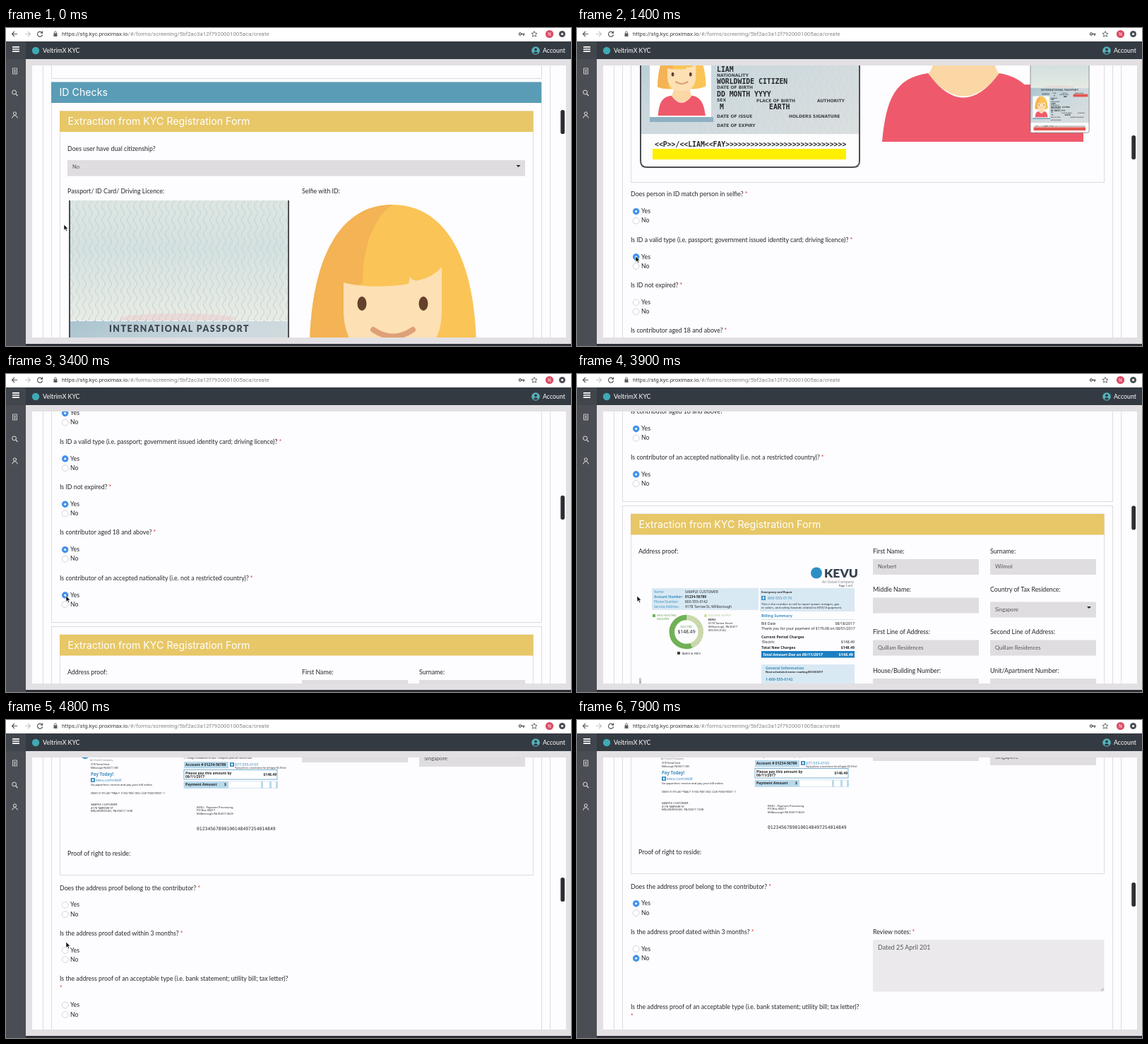
Animation, 800 px wide and 450 px high, one loop 8 s. Source, as an HTML page:

```html
<!DOCTYPE html>
<html lang="en">
<head>
<meta charset="utf-8">
<title>ID screening form</title>
<style>
  html, body { margin: 0; width: 100%; height: 100%; overflow: hidden; background: #fff; }
  svg { display: block; width: 800px; height: 450px; }
  text { white-space: pre; }
</style>
</head>
<body>
<script>
const LOOP = 8000, STEP = 100;
const LATO = 'Lato, sans-serif', INTER = 'Inter, sans-serif', WIDE = 'DejaVu Sans, sans-serif',
      MONO = 'DejaVu Sans Mono, monospace', NOTO = 'Noto Sans, sans-serif';
const INK = '#26282c', BLUE = '#3f8fc0', PALE = '#d9e9f3', SKY = '#b9d9eb', FIELD = '#dfdde0', LINE = '#dcdbdf';

// Drawing helpers; the y of a text is the middle of its capitals.
const esc = s => s.replace(/&/g, '&amp;').replace(/</g, '&lt;');
const text = (x, y, s, size = 8.8, fill = INK, font = LATO, more = '') =>
  `<text x="${x}" y="${y + size * .36}" font-size="${size}" fill="${fill}" font-family="${font}" ${more}>${esc(s)}</text>`;
const rect = (x, y, x2, y2, fill, more = '') =>
  `<rect x="${x}" y="${y}" width="${x2 - x}" height="${y2 - y}" fill="${fill}" ${more}/>`;
const path = (d, fill = 'none', more = '') => `<path d="${d}" fill="${fill}" ${more}/>`;
const dot = (x, y, r, fill, more = '') => `<circle cx="${x}" cy="${y}" r="${r}" fill="${fill}" ${more}/>`;
const group = (more, s) => `<g ${more}>${s}</g>`;
const frame = (x, y, x2, y2) => rect(x, y, x2, y2, 'none', `stroke="${LINE}"`);
const BOLD = 'font-weight="700"', END = 'text-anchor="end"', MID = 'text-anchor="middle"';

// ---- browser and app chrome
function chrome() {
  const icon = (d, color = '#fff', w = 1.1) => path(d, 'none', `stroke="${color}" stroke-width="${w}"`);
  return rect(0, 0, 800, 19, '#fff') +
    icon('M16 8.5H9M12 5L8.5 8.5L12 12', '#55585c', 1.2) +
    icon('M27 8.5H34M31 5L34.5 8.5L31 12', '#c4c5c8', 1.2) +
    icon('M51 6.5A3.6 3.6 0 1 0 51.6 9.5M51.6 4.5V7.2H49', '#55585c', 1.2) +
    rect(67.5, 7.5, 72.5, 12, '#5b5e62') + icon('M68.6 8V6.5a1.4 1.6 0 0 1 2.8 0V8', '#5b5e62', .9) +
    `<text x="79" y="11.3" font-size="7.9" fill="#85878b" font-family="Roboto, sans-serif"><tspan fill="#3b3e42">https://stg.kyc.proximax.io</tspan>/#/forms/screening/5bf2ac3a12f7920001005aca/create</text>` +
    dot(728, 8.5, 1.6, 'none', 'stroke="#55585c" stroke-width="1.2"') + icon('M729.6 8.5H734.5M733 8.5V11', '#55585c', 1.3) +
    icon('M748 4.6l1.2 2.6 2.8.3-2.1 1.9.6 2.8-2.5-1.4-2.5 1.4.6-2.8-2.1-1.9 2.8-.3z', '#55585c', .9) +
    dot(769.5, 8.5, 5.6, '#dc4c66') + text(769.5, 8.5, 'N', 6, '#fff', INTER, MID) +
    dot(787.5, 8.5, 4.5, '#4a4d52') + dot(787.5, 8.5, 1.6, '#fff') +
    rect(0, 19, 800, 44, '#343a41') + rect(0, 19, 28, 450, '#4b4d54') + rect(0, 19, 28, 44, '#41454c') +
    rect(28, 447, 800, 450, '#2c2f35') +
    icon('M9 26.8H19M9 30H19M9 33.2H19', '#fff', 1.7) +
    icon('M9.5 57H15.5V65H9.5ZM11 59.5H14M11 61.2H14M11 63H14', '#d5d6d9', .9) +
    dot(11.6, 91, 2.9, 'none', 'stroke="#e3e4e6"') + icon('M13.7 93.2L16.5 96', '#e3e4e6', 1.1) +
    dot(12.5, 121, 2.1, 'none', 'stroke="#e3e4e6"') + icon('M8.8 127.5C9 122.8 16 122.8 16.2 127.5', '#e3e4e6', 1) +
    dot(42, 32, 5.2, '#3fa9b5') + text(52, 31.5, 'VeltrimX KYC', 8.8, '#fff') +
    dot(750, 32, 5.8, '#55b3bd') + dot(750, 30.4, 1.9, '#343a41') + path('M746.6 35.3Q750 31.2 753.4 35.3Q750 38 746.6 35.3', '#343a41') +
    text(760, 32, 'Account', 8.8, '#fff');
}

// ---- illustrated girl
const head =
  path('M430 452C432 330 470 250 547 250S664 330 666 448Q640 460 612 461H487Q455 462 430 452', '#fbc457') +
  path('M547 250C520 270 505 310 505 361L484 370V461Q455 462 430 452C432 330 470 250 547 250', '#f4b354') +
  path('M508 450H588Q588 484 598 495Q548 558 497 495Q508 484 508 450Z', '#fbd7a5') +
  path('M478 360C500 367 545 367 570 362L572 352Q576 359 584 357Q606 352 617 338V400C617 448 590 472 548 472S478 448 478 400Z', '#fde0b4') +
  [504, 591].map(x => `<ellipse cx="${x}" cy="390" rx="6.5" ry="10" fill="#65402c"/>`).join('') +
  path('M520 427Q548 446 576 427', 'none', 'stroke="#dfa077" stroke-width="8" stroke-linecap="round"');
const bust = path('M432 591C438 530 450 501 497 494Q547 563 598 494C640 501 656 530 664 591Z', '#ee5a6c');

// ---- passport, in its own local frame
function passport(bar) {
  const label = (x, y, s, size = 6) => text(x, y, s, size, '#3d4249', WIDE, BOLD);
  const value = (x, y, s) => text(x, y, s, 9.8, '#24272c', MONO, BOLD);
  const labels = [[208, 84, 'TYPE'], [256, 84, 'CODE OF'], [243, 90, 'ISSUING STATE'], [324, 84, 'PASSPORT NO.'],
    [198, 105, 'SURNAME'], [198, 122.5, 'GIVEN NAMES'], [198, 140, 'NATIONALITY'], [198, 157, 'DATE OF BIRTH'],
    [198, 175, 'SEX'], [254, 176, 'PLACE OF BIRTH'], [340, 176, 'AUTHORITY'], [198, 198, 'DATE OF ISSUE'],
    [300, 198, 'HOLDERS SIGNATURE'], [198, 211, 'DATE OF EXPIRY']];
  const values = [[214, 94, 'P'], [265, 100, 'WWW'], [198, 113, 'FAY'], [198, 131, 'LIAM'],
    [198, 148, 'WORLDWIDE CITIZEN'], [198, 166, 'DD MONTH YYYY'], [202, 184, 'M'], [272, 184, 'EARTH']];
  return path('M90 -113V261Q90 270 99 270H391Q400 270 400 261V-113Z', '#fdfdfd') +
    rect(90, -113, 400, 57, 'url(#page)') + rect(90, -113, 400, 57, 'url(#wave)') +
    `<ellipse cx="243" cy="54" rx="82" ry="7" fill="#eeb9bd" opacity=".35"/>` +
    rect(90, 57, 400, 223, 'url(#data)') + rect(90, 80, 400, 223, 'url(#wave)', 'opacity=".4"') +
    path('M91 57.5H399', 'none', 'stroke="#f2f6f7" stroke-dasharray="9 3"') +
    text(146, 69, 'INTERNATIONAL PASSPORT', 12.4, '#3f464f', LATO, 'font-weight="900" letter-spacing="1.5"') +
    text(190, 84.5, 'PASSPORT', 7, '#3d4249', INTER, END) + text(190, 91, 'PASSEPORT', 7, '#3d4249', INTER, END) +
    rect(103, 199, 193, 206, '#8db0c2') + rect(103, 97, 190, 199, '#fff') +
    group('transform="translate(-10.6 25.5) scale(.29)"', head + bust) +
    labels.map(a => label(...a)).join('') + values.map(a => value(...a)).join('') +
    rect(316, 87, 393, 100, bar) +
    value(110, 237.5, '<<P>>/<<LIAM<<FAY' + '>'.repeat(29)) + rect(107, 244, 381, 259, bar) +
    path('M90 -113V261Q90 270 99 270H391Q400 270 400 261V-113', 'none', 'stroke="#4b4d52" stroke-width="2"');
}

function selfie() {
  return head + bust + path('M600 510H717V591H600Z', '#ee5a6c') + dot(684, 470, 21, '#fbd5ab') +
    rect(642, 464, 726, 578, '#fdfcfe') +
    group('transform="translate(617.9 497.5) scale(.268 .299)"', passport('#e2564f'));
}

// ---- utility bill, in its own local frame
function bill() {
  const n = (x, y, s, size = 5.2, fill = INK, more = '') => text(x, y, s, size, fill, NOTO, more);
  const b = (x, y, s, size, fill, more = '') => n(x, y, s, size, fill, BOLD + ' ' + more);
  const brand = (x, y, size, r) => dot(x - r - 3, y, r, '#2f8fc4') + text(x, y, 'KEVU', size, '#34424f', LATO, 'font-weight="900"');
  const chip = (x, y) => rect(x, y - 3, x + 6, y + 3, BLUE) + rect(x + 2, y - 1.5, x + 4, y + 1.5, '#fff');
  const ring = (d, c, more = '') => path(d, 'none', `stroke="${c}" stroke-width="7.5" ${more}`);
  let s = brand(350, 110.5, 17.5, 8) + n(347, 123, 'An Ostvel Company', 4.9, '#7c8086') + n(390, 128.5, 'Page 1 of 3', 3.7, INK, END) +
    rect(106, 132, 257, 163, PALE) + rect(259, 132, 393, 165, PALE);
  [['Name:', 'SAMPLE CUSTOMER'], ['Account Number:', '01234-56789'], ['Phone Number:', '800-555-0142'],
   ['Service Address:', '4178 Tarrow St, Millborough']].forEach(([k, v], i) => {
    const put = i == 1 ? b : n;
    s += put(109, 137 + 7 * i, k, 4.7, BLUE) + put(153, 137 + 7 * i, v, 5, INK);
  });
  s += b(261, 137.5, 'Emergency and Repair', 3.9, INK) + chip(261, 146) + n(270, 146, '800-555-0176', 5.4, BLUE) +
    n(261, 154.5, 'This is the number to call to report power outages, gas', 4.3) +
    n(261, 159.5, 'or odors, and safety hazards related to KEVU Equipment.', 4.3) +
    rect(107, 169, 111, 173, '#72b257') + n(113, 171, 'KEVU ELECTRIC', 3.9, '#5ba144') + n(113, 176, 'DELIVERY', 3.9, '#5ba144') +
    rect(180, 169, 184, 173, '#d5dfb4') + n(186, 171, 'ELECTRIC SUPPLY', 3.9, '#a6c58d') + b(186, 177, 'KEVU', 3.9) +
    n(186, 182, '4178 Tarrow Street', 3.9) + n(186, 187, 'Millborough, PA 00417', 3.9) + n(186, 192, '800-555-0142', 3.9) +
    ring('M155 173.5A20.5 20.5 0 0 1 162 213.2', '#e1e4bb') +
    ring('M155 173.5A20.5 20.5 0 0 1 162 213.2', '#a9c793', 'stroke-dasharray="1 1.5"') +
    ring('M162 213.2A20.5 20.5 0 1 1 155 173.5', '#70b156') +
    n(155, 187, 'ELECTRIC', 3.9, '#5ba144', MID) + n(155, 194, '$148.49', 6.8, INK, MID) +
    rect(142, 222, 146, 226, '#444') + n(148, 224, 'TAXES & FEES', 4.3) +
    b(261, 171, 'Billing Summary', 5.3, BLUE) + rect(261, 176, 393, 176.5, '#aac8da');
  [[182, 'Bill Date', '08/18/2017', n], [189, 'Thank you for your payment of $176.08 on 08/01/2017', '', n],
   [201.5, 'Current Period Charges', '', b], [208.5, ' Electric', '$148.49', n], [216, 'Total New Charges', '$148.49', b]]
    .forEach(([y, k, v, put]) => s += put(261, y, k, 5.2, INK) + put(393, y, v, 5.2, INK, END));
  s += rect(261, 221, 393, 230.5, '#1d7fc1') + b(263, 226, 'Total Amount Due on 09/11/2017', 5.5, '#fff', 'font-style="italic"') +
    b(391, 226, '$148.49', 5.5, '#fff', END) + rect(261, 240, 393, 306, PALE) + b(267, 245, 'General Information', 5.3, BLUE) +
    b(267, 251, 'Next scheduled meter reading:09/20/2017', 3.9) + b(267, 261.5, '1-800-555-0142', 5.3, BLUE) +
    n(267, 268, 'If you have any questions, please call  800-555-0142', 4.2) +
    n(267, 273.5, 'before the due date. Si tiene alguna pregunta, favor de llamar al', 4.2) +
    n(267, 279, 'numero 1-800-555-0142 antes de la fecha de vencimiento.', 4.2) +
    b(267, 289, 'kevu.com/service', 5.5, BLUE) + b(267, 295, 'Customer Self Service - Manage Your Account 24/7', 4) +
    n(267, 300, 'Start, stop and move your service', 4.2) +
    group('transform="rotate(-90 90 305)"', n(90, 305, '00022127-0000001-0001-00000001', 2.8)) +
    chip(118, 363) + n(128, 363, 'Online:', 4.4) + b(142, 363, 'kevu.com', 4.4, BLUE) +
    chip(190, 363) + n(199, 363, 'In Person:', 4.4) + b(219, 363, '4178 Tarrow St, Millborough, PA 00417', 4.4, BLUE) +
    chip(318, 363) + n(328, 363, 'By Phone:', 4.4) + b(347, 363, '1-800-555-0142', 4.4, BLUE) +
    path('M88 369.5H403', 'none', 'stroke="#b8babd" stroke-width=".6" stroke-dasharray="3 2"') +
    n(155, 372.5, 'Return only this portion with your check made payable to KEVU. Please write your account number on your check.', 3.5) +
    brand(121, 380, 12, 6) + n(119, 387.5, 'An Ostvel Company', 3.5, '#7c8086') +
    n(120, 394, '4178 Tarrow Street', 3) + n(120, 398.5, 'Millborough PA 00417-1380', 3) +
    ['Enroll in Automatic Payment, Complete form on reverse side.', 'Pledge a donation to RELF, Complete form on reverse side.']
      .map((t, i) => rect(252, 377 + 6 * i, 254.5, 379.5 + 6 * i, '#fff', 'stroke="#777" stroke-width=".4"') + n(256.5, 379 + 6 * i, t, 3.6, INK, 'font-style="italic"')).join('') +
    rect(252, 390, 315, 399.5, SKY) + b(254, 394.5, 'Account # 01234-56789', 5.1) + chip(317, 394) +
    n(324, 394, '877-555-0193', 5.2, BLUE) + n(324, 399, 'Pay by phone, a convenience fee will apply ($2.35 fee)', 2.9) +
    b(120, 408, 'Pay Today!', 6.1, BLUE) + rect(252, 401.5, 384, 415, '#fff', `stroke="${BLUE}" stroke-width=".7"`) +
    b(254, 406, 'Please pay this amount by', 5) + b(254, 411.5, '09/11/2017', 5) + b(383, 408, '$148.49', 5, INK, END) +
    chip(120, 416) + n(127, 416, 'kevu.com/ebill', 5.4, BLUE) + n(120, 422.5, 'Go paperless: receive and pay your bill online.', 4.1) +
    rect(252, 418, 384, 427.5, '#fff', `stroke="${SKY}" stroke-width=".6"`) + rect(252, 418, 315, 427.5, SKY) +
    [361, 373, 382].map(x => rect(x, 418, x + 3, 427.5, SKY)).join('') +
    b(254, 422.5, 'Payment Amount', 5.1) + b(309, 422.5, '$', 5.1) +
    n(120, 435, '000001 01 SP 0.460 **MAIL P  H 1002 TR061 0002  C2L81 P0003 P00001 1 1', 3) +
    ['SAMPLE CUSTOMER', '4178 TARROW ST', 'MILLBOROUGH, PA 00417-1338'].map((t, i) => n(120, 451 + 4.5 * i, t, 4)).join('') +
    ['KEVU - Payment Processing', 'PO Box 00417', 'Millborough PA 00417-0629'].map((t, i) => n(270, 454.5 + 4.5 * i, t, 4)).join('') +
    text(270, 485, '01234567890100148497254014849', 6.4, INK, MONO);
  return s;
}

// ---- form
const YES = {};
let picks = 0;
function radio(y, label, at) {
  let s = dot(83.7, y + .5, 4.4, '#fff', 'stroke="#c9c8cd" stroke-width=".8"');
  if (at) {
    const id = 'pick' + picks++;
    YES[id] = at;
    s += group(`id="${id}"`, dot(83.7, y + .5, 4.6, '#3f92ee') + dot(83.7, y + .5, 1.5, '#fff'));
  }
  return s + text(91, y, label);
}
const starred = (x, y, s) => text(x, y, s).replace('</text>', '<tspan dx="2" fill="#e02b2b">*</tspan></text>');
const ask = (y, q, yesAt, noAt, star = true) =>
  (star ? starred(76, y, q) : text(76, y, q) + text(76, y + 13, '*', 8.8, '#e02b2b')) +
  radio(y + (star ? 23.8 : 37), 'Yes', yesAt) + radio(y + (star ? 37 : 50.5), 'No', noAt);
const band = (x, y, x2, fill, s) => rect(x, y, x2, y + 29.5, fill) + text(x + 11.5, y + 14.5, s, 14.2, '#fff', INTER);
const arrow = (x, y) => path(`M${x - 3} ${y - 1.5}h6l-3 3z`, '#222');

function field(col, y, label, value, select) {
  const x = col ? 585 : 419, top = y + (select ? 17.5 : 11.5);
  return text(x, y, label) + rect(x, top, x + 150, top + 22, FIELD) + text(x + 7, top + 10.5, value, 7.6, '#55575c') +
    (select ? arrow(x + 140, top + 8) : '');
}

function page() {
  const fields = [
    [0, 1055.5, 'First Name:', 'Norbert'], [1, 1055.5, 'Surname:', 'Wilmot'],
    [0, 1110, 'Middle Name:', ''], [1, 1110, 'Country of Tax Residence:', 'Singapore', true],
    [0, 1170, 'First Line of Address:', 'Quillam Residences'], [1, 1170, 'Second Line of Address:', 'Quillam Residences'],
    [0, 1224.5, 'House/Building Number:', '47'], [1, 1224.5, 'Unit/Apartment Number:', '26-05'],
    [0, 1279, 'City/Town:', 'Singapore'], [1, 1279, 'State/Province:', 'Singapore'],
    [0, 1333.5, 'Postal Code:', '418326'], [1, 1333.5, 'Country:', 'Singapore', true]];
  return frame(52.5, -50, 770.5, 2000) + frame(64.5, -50, 758.5, 71.5) + frame(64.5, 77, 758.5, 985.5) +
    frame(64.5, 991.5, 758.5, 2000) + band(64, 76.5, 758, '#5a9cb6', 'ID Checks') +
    frame(76.5, 118, 746.5, 648.5) + band(76, 117.5, 746.5, '#e7c767', 'Extraction from KYC Registration Form') +
    text(87, 170.5, 'Does user have dual citizenship?') + rect(87, 187, 735, 209.5, FIELD) +
    text(94, 196, 'No', 7.6, '#55575c') + arrow(725.5, 195.5) +
    text(87, 230.5, 'Passport/ ID Card/ Driving Licence:') + text(419, 230.5, 'Selfie with ID:') +
    group('transform="translate(0 357)"', passport('#ffef00')) + selfie() +
    ask(665.2, 'Does person in ID match person in selfie?', 1100) +
    ask(729.6, 'Is ID a valid type (i.e. passport; government issued identity card; driving licence)?', 1400) +
    ask(794, 'Is ID not expired?', 1800) + ask(858.3, 'Is contributor aged 18 and above?', 3000) +
    ask(922.6, 'Is contributor of an accepted nationality (i.e. not a restricted country)?', 3300) +
    frame(76.5, 1003, 746.5, 1526.5) + band(76, 1003, 746.5, '#e7c767', 'Extraction from KYC Registration Form') +
    text(87, 1055.5, 'Address proof:') + fields.map(f => field(...f)).join('') +
    group('transform="translate(0 976)"', bill()) + text(87, 1495.5, 'Proof of right to reside:') +
    ask(1544.5, 'Does the address proof belong to the contributor?', 5300) +
    ask(1608.7, 'Is the address proof dated within 3 months?', 0, 5800) +
    group('id="notes"', starred(419, 1609, 'Review notes:') +
      rect(419, 1620, 746.5, 1693.5, '#ebe9ec') + path('M742 1692l3.5-3.5M744 1692l1.5-1.5', 'none', 'stroke="#777" stroke-width=".7"') +
      text(426, 1630.5, '', 8.9, '#55575c', LATO, 'id="typed"')) +
    group('id="tail"', ask(1673, 'Is the address proof of an acceptable type (i.e. bank statement; utility bill; tax letter)?', 0, 0, false));
}

const fade = (id, dir, a, b, c) => `<linearGradient id="${id}" x2="${dir}" y2="1"><stop stop-color="${a}"/><stop offset=".4" stop-color="${b}"/><stop offset="1" stop-color="${c}"/></linearGradient>`;
document.body.innerHTML = `<svg viewBox="0 0 800 450"><defs>
  <clipPath id="view"><rect x="37" y="53" width="756" height="385"/></clipPath>
  ${fade('page', 0, '#dde6e2', '#d5e1e0', '#e9ece4')}${fade('data', 1, '#a9c4cf', '#cbd8dd', '#dcdfe0')}
  <pattern id="wave" width="9" height="20" patternUnits="userSpaceOnUse">${path('M3 0q5 5 0 10t0 10', 'none', 'stroke="#b4cdd0" stroke-width=".8"')}</pattern>
  </defs>${rect(0, 0, 800, 450, '#e2e0e3')}${rect(37, 53, 793, 438, '#fdfcfe')}
  <g clip-path="url(#view)"><g id="doc">${page()}</g></g>
  ${rect(785.3, 0, 791, 34, '#2d2e32', 'id="thumb" rx="2.5"')}${chrome()}
  <path id="arrow" d="M0 0V8.2L2 6.5L3.4 9.5L4.8 8.9L3.4 6H6Z" fill="#111" stroke="#fff" stroke-width=".6"/>
  <path id="beam" d="M-2 -5Q0 -5 0 -3.5Q0 -5 2 -5M0 -4V4M-2 5Q0 5 0 3.5Q0 5 2 5" fill="none" stroke="#333" stroke-width=".8"/></svg>`;

// ---- motion: rows of [time, values...]
const SCROLL = [[0, 0, 116], [100, 52, 120], [500, 357, 146], [700, 412, 150], [900, 430, 152], [1800, 430, 152],
  [2300, 547, 160], [2700, 634, 172], [3600, 634, 172], [4200, 976, 201], [4800, 1307, 223], [5000, 1309, 230]];
const MOUSE = [[0, 82, 278], [900, 82, 278], [1100, 83, 259], [1200, 83, 259], [1400, 83, 323], [1500, 83, 323],
  [1800, 82, 387], [2700, 82, 387], [3000, 84, 250], [3100, 84, 250], [3300, 85, 314], [5000, 85, 314],
  [5200, 84, 261], [5400, 84, 261], [5700, 84, 338], [5900, 84, 338], [6300, 511, 363]];
const TYPED = [[6300, 0], [6700, 5], [6800, 5], [7700, 16], [7900, 18]];
const NOTE = 'Dated 25 April 201';

function sample(rows, t) {
  const i = rows.findIndex(r => r[0] > t);
  if (i < 0) return rows[rows.length - 1].slice(1);
  if (!i) return rows[0].slice(1);
  const [a, b] = [rows[i - 1], rows[i]], k = (t - a[0]) / (b[0] - a[0]);
  return a.slice(1).map((v, j) => v + (b[j + 1] - v) * k);
}
const $ = id => document.getElementById(id);
const show = (id, on) => $(id).setAttribute('visibility', on ? 'visible' : 'hidden');
const move = (id, x, y) => $(id).setAttribute('transform', `translate(${x} ${y})`);

function draw(t) {
  const [top, thumb] = sample(SCROLL, t), [x, y] = sample(MOUSE, t);
  move('doc', 0, -Math.round(top));
  move('thumb', 0, thumb);
  move('arrow', x, y);
  move('beam', x, y);
  show('arrow', t < 6200);
  show('beam', t >= 6200 && t < 6400);
  for (const id in YES) show(id, t >= YES[id]);
  const open = t >= 5800;
  show('notes', open);
  move('tail', 0, open ? 41.5 : 0);
  $('typed').textContent = NOTE.slice(0, Math.floor(sample(TYPED, t)[0] + 1e-6));
}

const start = performance.now();
function tick() {
  const t = (performance.now() - start) % LOOP;
  draw(Math.floor(t / STEP) * STEP);
  requestAnimationFrame(tick);
}
tick();
</script>
</body>
</html>
```
